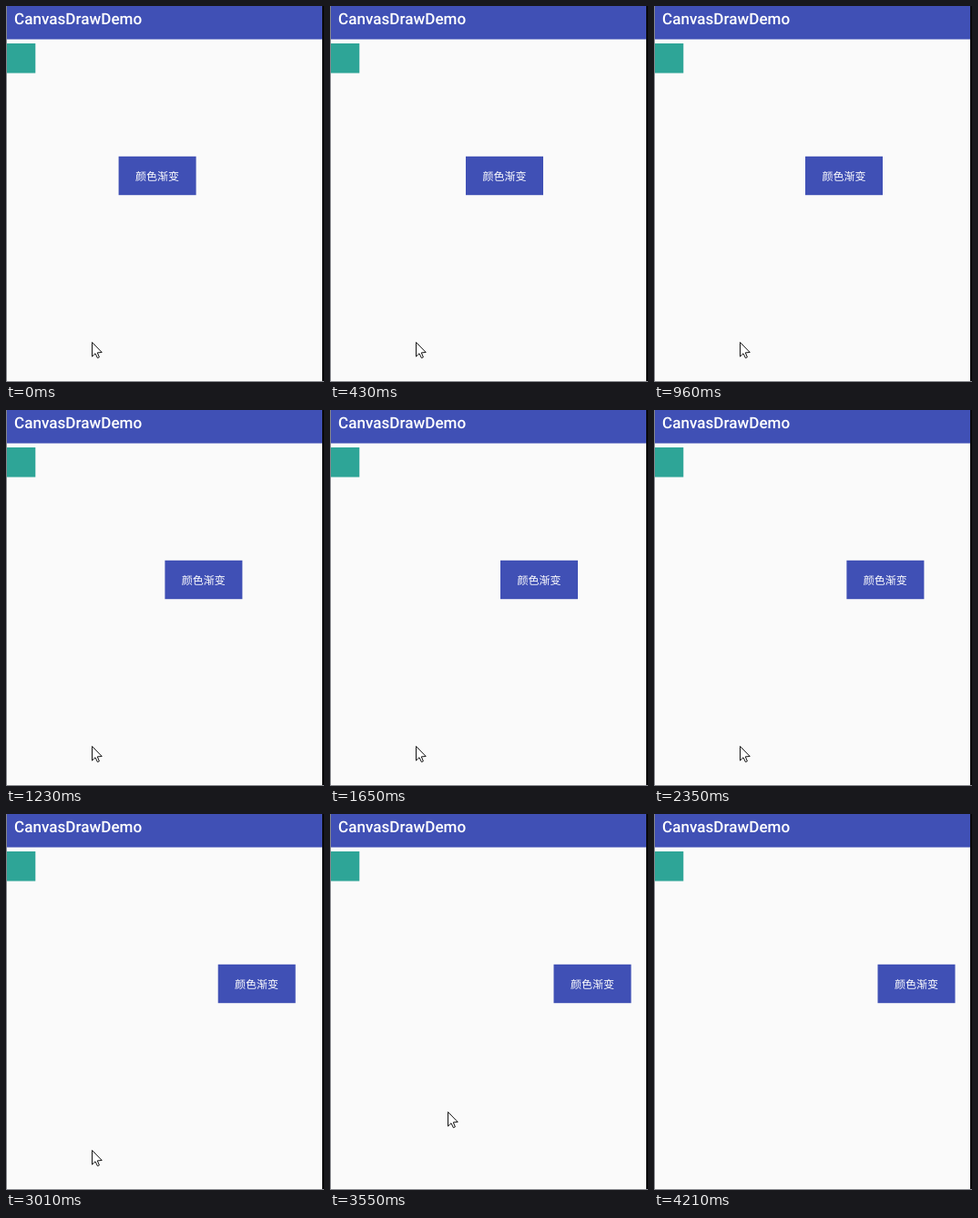
Animation, 349 px wide and 412 px high, one loop 4.46 s. Source, as an HTML page with a canvas:

```html
<!DOCTYPE html>
<html lang="zh-CN">
<head>
<meta charset="utf-8">
<title>CanvasDrawDemo</title>
<style>
  html, body { margin: 0; width: 100%; height: 100%; overflow: hidden; background: #fafafa; }
  canvas { display: block; width: 349px; height: 412px; }
</style>
</head>
<body>
<canvas id="stage"></canvas>
<script>
const W = 349, H = 412, LOOP = 4460;
const INDIGO = '#4050b5', EDGE = '#85868c';
const canvas = document.getElementById('stage');
const ctx = canvas.getContext('2d');
const ratio = window.devicePixelRatio || 1;
canvas.width = W * ratio;
canvas.height = H * ratio;
ctx.scale(ratio, ratio);
ctx.textRendering = 'geometricPrecision';

// The screen refreshes slowly at first, then at a steady rate
const STEADY = 960, SLOW_STEP = 265, STEP = 135;
// Key points: refresh step, then position
const slide = [[-3, 123.6], [-2, 149], [0, 166], [5, 187], [10, 211.4], [18, 245.5]];
const pointer = [[16, 94, 368], [19, 129, 326], [20, 134, 320], [23, 165, 282]];
const POINTER_GONE = 24;

function stepAt(t) {
  return Math.floor((t - STEADY) / (t < STEADY ? SLOW_STEP : STEP));
}

// Linear position between key points, held at both ends
function along(keys, step) {
  const next = keys.findIndex(key => key[0] > step);
  if (next === 0) return keys[0].slice(1);
  if (next < 0) return keys[keys.length - 1].slice(1);
  const [s0, ...from] = keys[next - 1];
  const [s1, ...to] = keys[next];
  const k = (step - s0) / (s1 - s0);
  return from.map((v, i) => v + (to[i] - v) * k);
}

function rect(x, y, w, h, color) {
  ctx.fillStyle = color;
  ctx.fillRect(x, y, w, h);
}

function text(str, x, y, font) {
  ctx.font = font;
  ctx.fillStyle = '#fff';
  ctx.fillText(str, x, y);
}

function drawScreen() {
  rect(0, 0, W, H, '#fafafa');
  rect(0, 0, W, 36.5, INDIGO);
  text('CanvasDrawDemo', 9, 19.5, '500 17.1px Roboto, sans-serif');
  rect(1, 41, 31.3, 32.5, '#2ea597');
  rect(0, 0, 1, H, EDGE);
  rect(347, 0, 2, H, '#08080a');
  rect(0, H - 1, W, 1, EDGE);
}

function drawButton(x) {
  rect(x, 164.8, 85, 42.4, INDIGO);
  text('颜色渐变', x + 18.4, 190.8, '500 12px "Noto Sans CJK SC", "Noto Sans CJK", sans-serif');
}

function drawPointer(x, y) {
  const outline = [[0, 0], [0, 15.6], [3.5, 12.3], [5.9, 17.2], [7.9, 16.3], [5.8, 11.4], [10.7, 11]];
  ctx.beginPath();
  for (const [dx, dy] of outline) ctx.lineTo(x + 0.5 + dx, y + 0.5 + dy);
  ctx.closePath();
  ctx.fillStyle = '#fff';
  ctx.fill();
  ctx.lineWidth = 1;
  ctx.strokeStyle = '#111';
  ctx.lineJoin = 'round';
  ctx.stroke();
}

function render(t) {
  const step = stepAt(t);
  drawScreen();
  drawButton(along(slide, step)[0]);
  if (step < POINTER_GONE) drawPointer(...along(pointer, step).map(Math.round));
}

const start = performance.now();
function tick() {
  render((performance.now() - start) % LOOP);
  requestAnimationFrame(tick);
}
tick();
</script>
</body>
</html>
```
